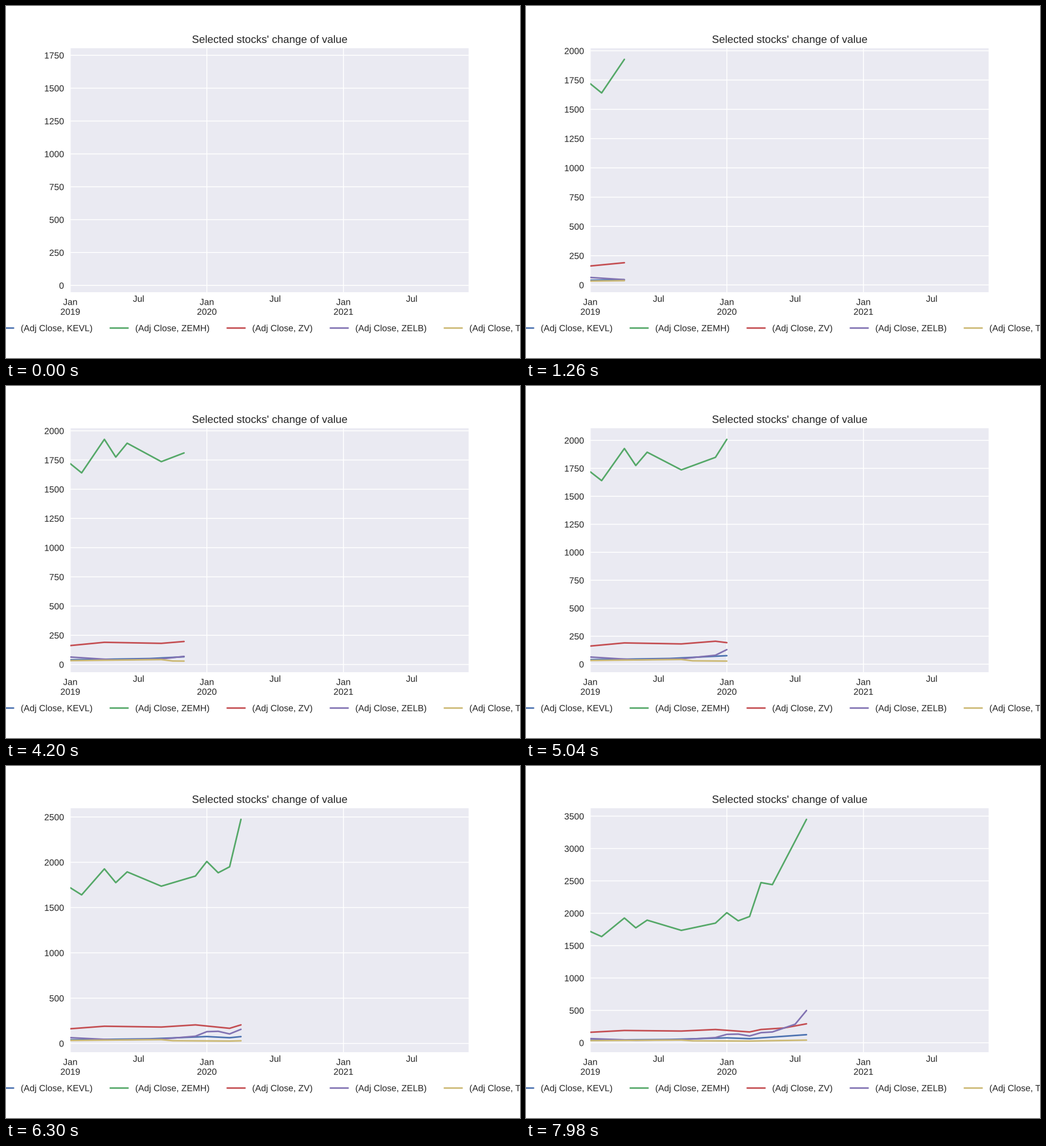
A matplotlib script for the animation above (8000 ms loop, 903 by 620 pixels).

```python
import matplotlib.pyplot as plt
import numpy as np
from matplotlib.animation import FuncAnimation
from matplotlib.patheffects import Normal

WIDTH, HEIGHT, DPI = 903, 620, 128
PT = WIDTH / 8 / DPI          # sizes are given for an eight inch wide figure
INTERVAL, FRAMES, STEP = 40, 200, 420
MONTHS = np.arange(36)
INK = "0.15"

# Turning points of each price, month: value; straight lines in between.
STOCKS = {
    "KEVL": ("#4C72B0", {0: 40, 7: 51, 12: 76, 14: 63, 19: 125}),
    "ZEMH": ("#55A868", {0: 1719, 1: 1640, 3: 1927, 4: 1775, 5: 1894, 8: 1736, 11: 1848,
                         12: 2009, 13: 1884, 14: 1950, 15: 2474, 16: 2442, 19: 3451}),
    "ZV": ("#C44E52", {0: 162, 3: 190, 8: 181, 11: 205, 14: 167, 15: 205, 17: 228, 19: 293}),
    "ZELB": ("#8172B2", {0: 64, 4: 39, 8: 48, 11: 80, 12: 130, 13: 134, 14: 105,
                         15: 156, 16: 167, 18: 286, 19: 498}),
    "TOHD": ("#CCB974", {0: 33, 8: 42, 9: 30, 14: 26, 19: 41}),
}

plt.rcParams.update({
    "font.family": "Liberation Sans",
    "font.size": 10 * PT,
    "text.color": INK,
    "text.hinting": "none",
    "axes.linewidth": 0,
    "lines.linewidth": 1.75 * PT,
    "lines.solid_capstyle": "round",
    "path.snap": False,
    "path.effects": [Normal()],   # draws text as smooth outlines
})

fig = plt.figure(figsize=(WIDTH / DPI, HEIGHT / DPI), dpi=DPI, facecolor="white")
ax = fig.add_axes([0.125, 0.187, 0.775, 0.693], facecolor="#EAEAF2")


def setup_axes():
    ax.spines[:].set_visible(False)
    ax.set_title("Selected stocks' change of value", fontsize=12 * PT, pad=6 * PT)
    ax.set_xlim(MONTHS[0], MONTHS[-1])
    ax.set_xticks(MONTHS[::12], [f"Jan\n{year}" for year in (2019, 2020, 2021)])
    ax.set_xticks(MONTHS[6::12], ["Jul"] * 3, minor=True)
    ax.tick_params(length=0, pad=7 * PT, labelcolor=INK)
    ax.tick_params(axis="x", which="minor", length=0, pad=3.4 * PT, labelcolor=INK)
    ax.grid(True, which="major", color="white", linewidth=PT, linestyle="-")
    ax.set_axisbelow(True)


setup_axes()
prices = [np.interp(MONTHS, list(turns), list(turns.values()))
          for _, turns in STOCKS.values()]
lines = [ax.plot([], [], color=color, label=f"(Adj Close, {name})")[0]
         for name, (color, _) in STOCKS.items()]
ax.legend(loc="upper center", bbox_to_anchor=(0.5, -0.1), ncols=len(lines), frameon=False)


def update(frame):
    elapsed = frame * INTERVAL + INTERVAL // 2
    count = elapsed // STEP + 1
    shown = [price[:count] for price in prices]
    for line, values in zip(lines, shown):
        line.set_data(MONTHS[:count], values)
    low, high = np.min(shown), np.max(shown)
    margin = 0.05 * (high - low)
    ax.set_ylim(low - margin, high + margin)
    return lines


anim = FuncAnimation(fig, update, frames=FRAMES, interval=INTERVAL,
                     init_func=lambda: update(0), repeat=True, repeat_delay=0)
plt.show()
```
